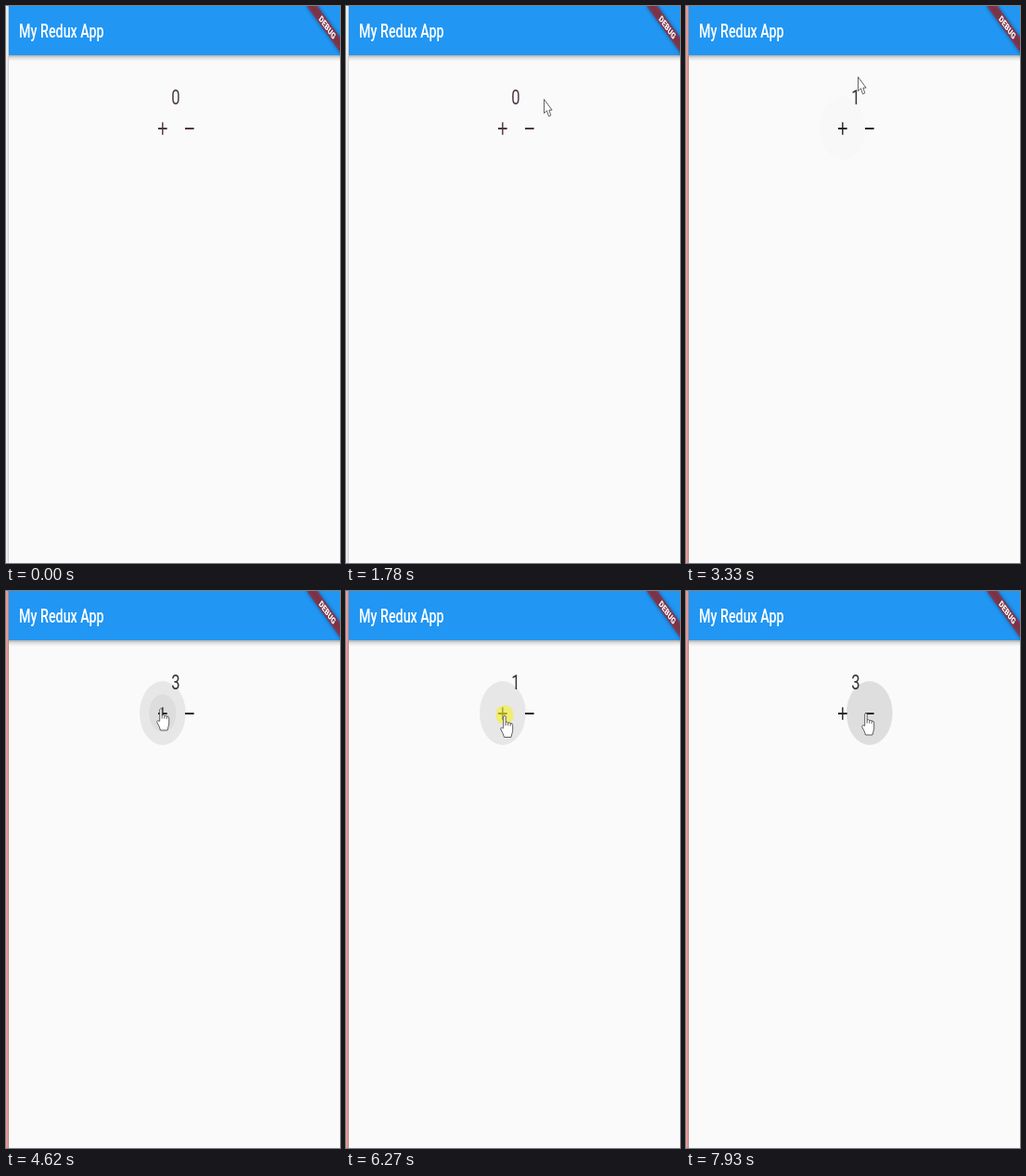
These frames come from a looping animation (360x600 px, 8000 ms). An HTML page:

```html
<!DOCTYPE html>
<html lang="en">
<head>
<meta charset="utf-8">
<title>Redux counter</title>
<style>
  html, body { margin: 0; width: 100%; height: 100%; overflow: hidden; background: #fafafa; }
  svg { display: block; width: 360px; height: 600px; font-family: Roboto, sans-serif; }
</style>
</head>
<body>
<svg viewBox="0 0 360 600">
  <defs>
    <linearGradient id="shade" x2="0" y2="1">
      <stop offset="0" stop-opacity=".3"/>
      <stop offset=".45" stop-opacity=".1"/>
      <stop offset="1" stop-opacity="0"/>
    </linearGradient>
    <filter id="blur" x="-20%" y="-80%" width="140%" height="260%"><feGaussianBlur stdDeviation="2.5"/></filter>
  </defs>
  <rect width="360" height="600" fill="#fafafa"/>

  <!-- the app, in its own units, squeezed as a whole -->
  <g transform="translate(3 0) scale(.69 .955)">
    <rect y="55.5" width="522" height="7" fill="url(#shade)"/>
    <rect width="522" height="55.5" fill="#2196f3"/>
    <text x="16" y="35.8" font-size="20.7" font-weight="500" fill="#fff">My Redux App</text>
    <g transform="translate(521.8 0) rotate(45)">
      <rect x="-40" y="28" width="80" height="12" opacity=".4" filter="url(#blur)"/>
      <rect x="-40" y="28" width="80" height="12" fill="#b71c1c" fill-opacity=".63"/>
      <text y="37.7" font-size="10.2" font-weight="900" text-anchor="middle" fill="#fff">DEBUG</text>
    </g>
    <g class="button" transform="translate(240.3 137.7)"><circle r="36"/><circle/></g>
    <g class="button" transform="translate(282.3 137.7)"><circle r="36"/><circle/></g>
    <text id="count" x="260.9" y="111.5" font-size="24" text-anchor="middle"></text>
    <path id="icons" d="M233.3 138.2h14m-7-7v14M275.3 138.2h14" stroke-width="2.1"/>
  </g>

  <rect id="strip" width="3" height="600"/>
  <rect id="edge" x="2" width="1" height="600"/>
  <g id="pointer" stroke="#3c3c3c" fill="#fff" stroke-width=".8" stroke-linejoin="round">
    <ellipse id="glow" rx="9.7" ry="10.5" fill="#f4f02c" fill-opacity=".62" stroke="none"/>
    <path id="arrow" d="M0 0V15L3 12.3L5 18.3L7.3 17.3L5.4 11.6H8.6Z"/>
    <path id="hand" d="M-1.3 14V1.5Q0-.5 1.2 1.5V8Q2.5 6.8 3.7 8.5Q5 7.5 6.2 9Q8.5 8.5 8.7 11V17Q8 20 7 24H-.5Q-1.5 20-4.2 15.5Q-4.5 12.5-1.3 14.5M1.2 8v3.5M3.7 8.5v3M6.2 9v3"/>
  </g>
</svg>
<script>
const LOOP = 8000, START = 130, FOCUS = 2800, PRESS = 65, FADE = 220;
const $ = id => document.getElementById(id);
const clamp = v => Math.max(0, Math.min(1, v));
const buttons = [...document.querySelectorAll('.button')];

// Places the pointer glides between.
const plus = [167, 126], plusLow = [171, 133.5], minus = [194, 131];
const stop = (arrive, [x, y], rest = 0) => ({ arrive, x, y, leave: arrive + rest });
const stops = [
  stop(START, [325, 560]),
  stop(330, [281, 420], 200),
  stop(1080, [127, 83]),
  stop(1290, [144, 159], 70),
  stop(1640, [306, 40]),
  stop(1780, [213.5, 100.5], 140),
  stop(2660, plus, 270),
  stop(3330, [185.5, 76.5]),
  stop(3460, [214, 100]),
  stop(3600, [179, 124], 200),
  stop(3936, plus, 690),
  stop(5095, minus, 625),
  stop(6130, plusLow, 900),
  stop(7240, minus, LOOP)
];

function pointerAt(t) {
  const i = Math.max(0, stops.findLastIndex(s => s.arrive <= t));
  const a = stops[i], b = stops[i + 1] ?? a;
  const k = clamp((t - a.leave) / (b.arrive - a.leave || 1));
  const ease = (1 - Math.cos(Math.PI * k)) / 2;
  return [a.x + (b.x - a.x) * ease, a.y + (b.y - a.y) * ease];
}

// Index of the button under the pointer, or -1.
function hovered(t) {
  const [x, y] = pointerAt(t);
  const i = x < 183.5 ? 0 : 1;
  return Math.hypot((x - [168.8, 197.8][i]) / 25, (y - 131.5) / 34.5) < 1 ? i : -1;
}

// Share of the recent past spent over a button gives a soft fade.
function hoverLevel(i, t, samples = 12) {
  let hits = 0;
  for (let k = 0; k < samples; k++) hits += hovered(t - FADE * k / samples) === i;
  return hits / samples;
}

// Each press acts on the button that lies under the pointer.
const series = (from, count, every) => Array.from({ length: count }, (_, k) => from + k * every);
const presses = [
  ...series(FOCUS, 1), ...series(4070, 2, 480), ...series(5220, 2, 430),
  ...series(6270, 5, 139), ...series(7310, 3, 241)
].map((at, k) => ({ at: at || FOCUS, button: hovered(at || FOCUS) }));

function draw(t) {
  const show = (id, on) => $(id).setAttribute('visibility', on ? 'visible' : 'hidden');
  const focused = t >= FOCUS;
  const total = presses.reduce((sum, p) => sum + (t >= p.at + PRESS ? 1 - 2 * p.button : 0), 0);

  $('count').textContent = total;
  $('count').setAttribute('fill', focused ? '#333' : '#4b3848');
  $('icons').setAttribute('stroke', focused ? '#2b2829' : '#4f3743');
  $('strip').setAttribute('fill', focused ? '#e29c9a' : '#ececec');
  $('edge').setAttribute('fill', focused ? '#bd8583' : '#d2d2d2');

  buttons.forEach((button, i) => {
    const [hover, splash] = button.children;
    const last = presses.findLast(p => p.button === i && p.at <= t);
    const age = last ? t - last.at : LOOP;
    hover.setAttribute('fill-opacity', .075 * hoverLevel(i, t));
    splash.setAttribute('r', 36 * clamp(age / 120));
    splash.setAttribute('fill-opacity', .045 * clamp((240 - age) / 120));
  });

  const visible = t >= START, hand = hovered(t) >= 0;
  $('pointer').setAttribute('transform', `translate(${pointerAt(t)})`);
  show('arrow', visible && !hand);
  show('hand', visible && hand);
  show('glow', presses.some(p => t >= p.at && t < p.at + PRESS));
}

const began = performance.now();
(function tick() {
  draw((performance.now() - began) % LOOP);
  requestAnimationFrame(tick);
})();
</script>
</body>
</html>
```
